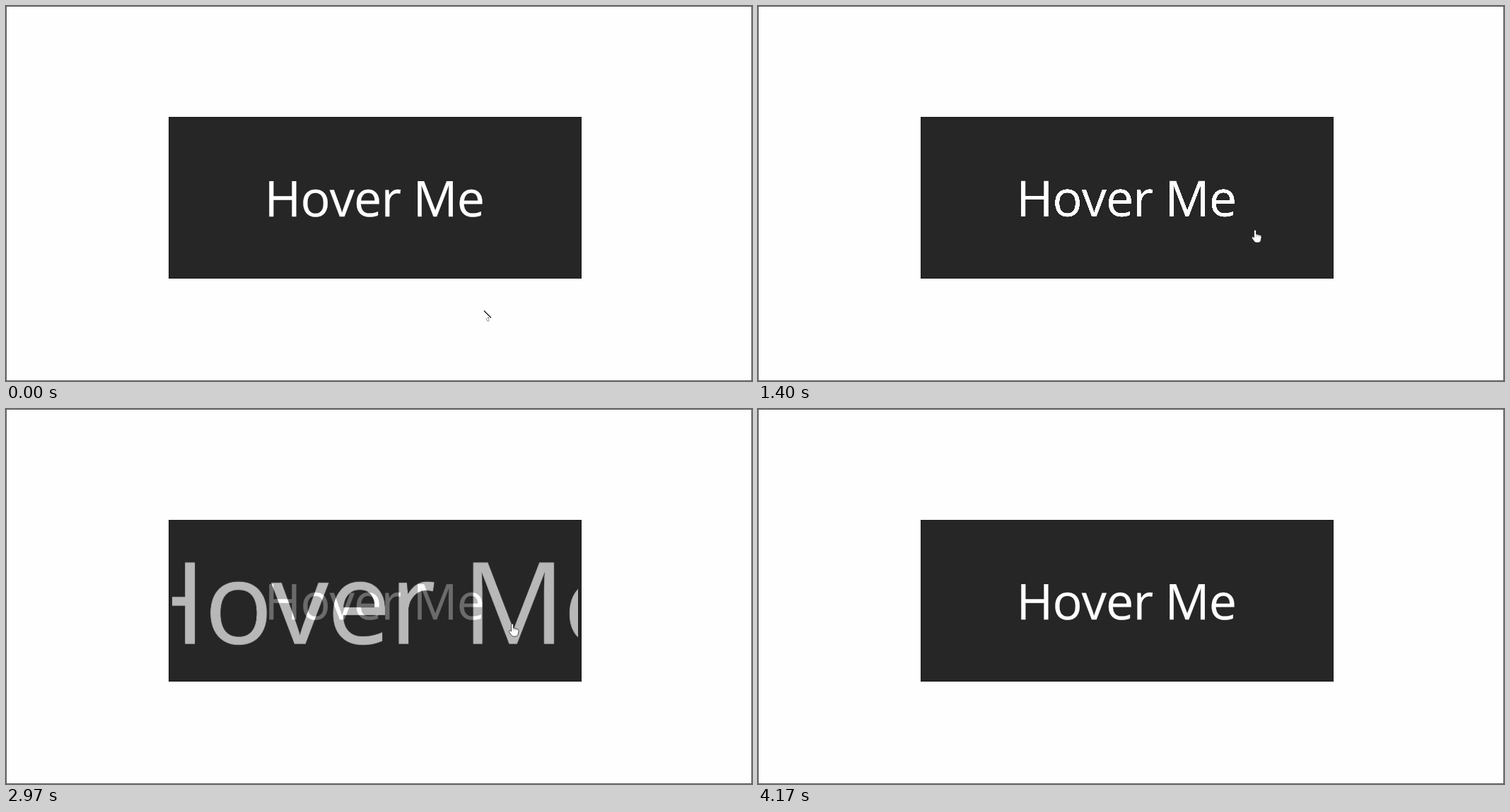
Write an HTML page that moves like this. It is 1055 by 531 pixels and loops after 4.83 s.

```html
<!DOCTYPE html>
<html lang="en">
<head>
<meta charset="utf-8">
<title>Hover zoom</title>
<style>
  html, body { margin: 0; width: 100%; height: 100%; overflow: hidden; background: #fefefe; }
  svg { display: block; width: 1055px; height: 531px; }

  .label {
    font: 400 70px "Open Sans", "Noto Sans", sans-serif;
    font-kerning: none;
    letter-spacing: -.85px;
    text-rendering: geometricPrecision;
    fill: #fff;
    stroke: #fff;
    stroke-width: .3px;
  }

  /* The two copies cross-fade additively, so their overlap stays white. */
  .blend { isolation: isolate; }
  .blend text { mix-blend-mode: plus-lighter; }

  .still, .zoom, .cursor, .arrow, .hand { animation: 4830ms infinite; }
  .still { animation-name: still; animation-timing-function: ease; }
  .zoom {
    animation-name: zoom;
    animation-timing-function: ease;
    transform-box: view-box;
    transform-origin: 521.5px 271px;
  }
  .cursor { animation-name: travel; animation-timing-function: linear; }
  .arrow { animation-name: arrow; animation-timing-function: step-end; }
  .hand { animation-name: hand; animation-timing-function: step-end; }

  @keyframes still {
    0%, 19.19%, 49.75%, 57.78%, 86.6%, 100% { opacity: 1; }
    28.61%, 40.33%, 67.2%, 77.18% { opacity: 0; }
  }
  @keyframes zoom {
    0%, 19.19%, 49.75%, 57.78%, 86.6%, 100% { opacity: 0; transform: scale(5); }
    28.61%, 40.33%, 67.2%, 77.18% { opacity: 1; transform: scale(1); }
  }
  @keyframes travel {
    0%, 15.6% { transform: translate(676px, 431px); }
    19.2% { transform: translate(688px, 385px); }
    21.8% { transform: translate(698px, 338px); }
    23.6%, 38.2% { transform: translate(703px, 317px); }
    40.3% { transform: translate(707px, 385px); }
    42.24%, 42.8% { transform: translate(711px, 464px); }
    45.2%, 55% { transform: translate(711px, 502px); }
    57.8% { transform: translate(711px, 385px); }
    58.39%, 58.9% { transform: translate(712px, 365px); }
    61.49%, 62% { transform: translate(716px, 304px); }
    64%, 74.6% { transform: translate(713px, 302px); }
    77.1% { transform: translate(640px, 385px); }
    79% { transform: translate(470px, 531px); }
    81.5% { transform: translate(215px, 440px); }
    83% { transform: translate(202px, 250px); }
    84.7% { transform: translate(321px, 121px); }
    85.4%, 100% { transform: translate(314px, 122px); }
  }
  @keyframes arrow {
    0%, 40.3%, 77.1% { opacity: 1; }
    19.2%, 57.8%, 86.2%, 100% { opacity: 0; }
  }
  @keyframes hand {
    0%, 40.3%, 77.1%, 100% { opacity: 0; }
    19.2%, 57.8% { opacity: 1; }
  }
</style>
</head>
<body>
<svg viewBox="0 0 1055 531">
  <defs>
    <clipPath id="inside"><rect x="235" y="162" width="574" height="218"/></clipPath>
  </defs>

  <rect x=".5" y=".5" width="1054" height="530" fill="#fefefe" stroke="#606060"/>
  <rect x="230.5" y="157.5" width="583" height="228" fill="#262626" stroke="#1c1c1c"/>

  <g clip-path="url(#inside)">
    <g class="blend label">
      <text class="still" x="365.6" y="297.7">Hover Me</text>
      <text class="zoom" x="365.6" y="297.7">Hover Me</text>
    </g>
  </g>

  <g class="cursor">
    <g class="arrow" fill="none">
      <path d="M0 0L0 14L3.5 11L6 16L8 15L6 10H10Z" fill="#fefefe"/>
      <path d="M0 .5L10 10.5" stroke="#111" stroke-width="1.2"/>
      <path d="M3 11.5L5 15.5M5.5 10.5H8M5.5 10.5L7.5 14.5L5.5 15.5" stroke="#555" stroke-dasharray="1.5 1"/>
    </g>
    <g class="hand">
      <path d="M-1.5 1Q0 -1 1.5 1V6L7.5 7.5Q9.3 8 9 10.5L8 15.5Q7.3 18 5 18H1.5Q-.3 18 -1.5 16L-4.7 11.5Q-4.8 9.3 -2.8 9.8L-1.5 11Z"
            fill="#fff" stroke="#262626" stroke-width=".8"/>
      <path d="M2 6.5V9.5M4.4 7V9.5M6.7 7.5V10" stroke="#666" stroke-width=".6"/>
    </g>
  </g>
</svg>
</body>
</html>
```
